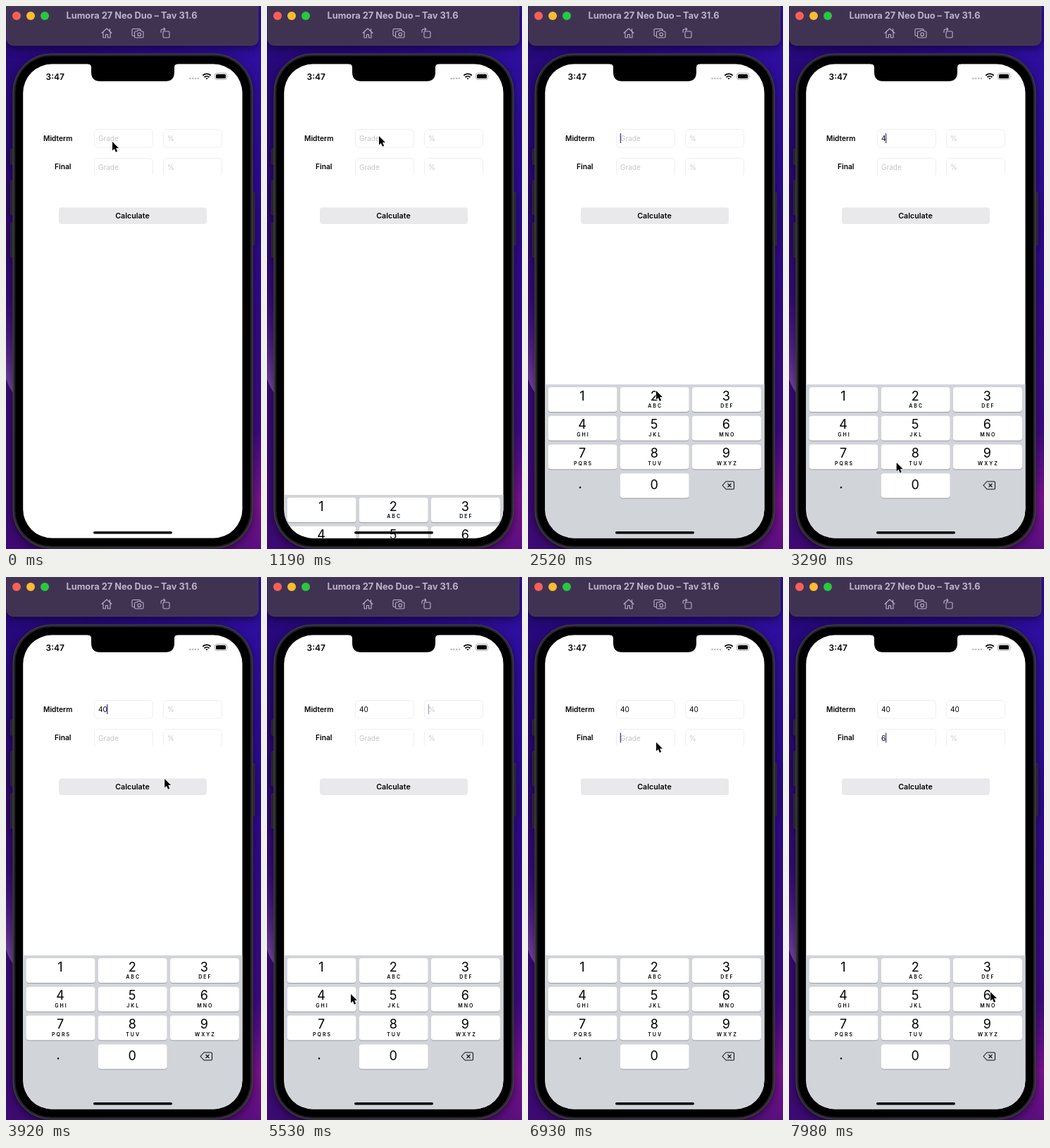
Write an HTML page that moves like this. It is 362 px wide and 772 px high and loops after 8 s.

```html
<!DOCTYPE html>
<html lang="en">
<head>
<meta charset="utf-8">
<title>Grade calculator</title>
<style>
html, body { margin: 0; width: 100%; height: 100%; overflow: hidden; background: #24086c; }
svg { display: block; width: 362px; height: 772px; font-family: Inter, Roboto, sans-serif; }
.label { font-weight: 600; font-size: 10.2px; }
.value { font-size: 10px; }
.digit { font-size: 18px; text-anchor: middle; }
.abc { font-size: 7px; font-weight: 600; letter-spacing: 2px; text-anchor: middle; }
.icon { fill: none; stroke: #bbb0cd; stroke-width: 1.1; stroke-linejoin: round; stroke-linecap: round; }
.field { fill: #fff; stroke: #eeeeef; }
.shadow { filter: drop-shadow(0 4px 6px rgba(0, 0, 0, .5)); }
</style>
</head>
<body>
<svg viewBox="0 0 362 772">
  <defs>
    <linearGradient id="wallL" x2="0" y2="1">
      <stop offset="0" stop-color="#270983"/><stop offset=".25" stop-color="#27086f"/>
      <stop offset=".5" stop-color="#320a70"/><stop offset="1" stop-color="#3c0a72"/>
    </linearGradient>
    <linearGradient id="wallR" x2="0" y2="1">
      <stop offset="0" stop-color="#2f10a4"/><stop offset=".4" stop-color="#2c0a8c"/>
      <stop offset=".78" stop-color="#3c0a82"/><stop offset=".91" stop-color="#78138c"/>
      <stop offset="1" stop-color="#5c0f80"/>
    </linearGradient>
    <linearGradient id="glow" x2="0" y2="1">
      <stop offset="0" stop-color="#4a1a86" stop-opacity="0"/><stop offset="1" stop-color="#7a4aa2"/>
    </linearGradient>
    <linearGradient id="across"><stop offset=".3" stop-color="#000"/><stop offset="1" stop-color="#fff"/></linearGradient>
    <mask id="blend"><rect width="362" height="772" fill="url(#across)"/></mask>
    <clipPath id="screen"><rect x="24.200" y="82.600" width="311.300" height="673.800" rx="41"/></clipPath>
    <clipPath id="cut"><rect x="120" y="210" width="200" height="30.500"/></clipPath>
  </defs>

  <rect width="362" height="772" fill="url(#wallL)"/>
  <rect width="362" height="772" fill="url(#wallR)" mask="url(#blend)"/>
  <path d="M0 400H12V552Q5 545 0 530z" fill="url(#glow)"/>

  <path class="shadow" d="M1 0H358V47a9 9 0 0 1-9 9H10a9 9 0 0 1-9-9z" fill="#403352" stroke="#584a6b" stroke-width=".6"/>
  <circle cx="15" cy="14" r="6" fill="#fe5f57"/>
  <circle cx="35" cy="14" r="6" fill="#febc2e"/>
  <circle cx="55" cy="14" r="6" fill="#28c840"/>
  <text x="178.500" y="18" text-anchor="middle" font-size="12.800" font-weight="700" fill="#bdb2d0">Lumora 27 Neo Duo – Tav 31.6</text>
  <g class="icon">
    <path d="M136 38.500L143 32l7 6.500M138 37.500v7.500h3.500v-4.500h3v4.500h3.500v-7.500M147.500 36v-3.500"/>
    <path d="M181.500 42.500h-1a1.500 1.500 0 0 1-1.500-1.500v-7a1.500 1.500 0 0 1 1.500-1.500h9a1.500 1.500 0 0 1 1.500 1.500"/>
    <path d="M184 36h2.200l1-1.500h4l1 1.500h1.300a1.500 1.500 0 0 1 1.500 1.500v6a1.500 1.500 0 0 1-1.500 1.500h-9.500a1.500 1.500 0 0 1-1.500-1.500v-6a1.500 1.500 0 0 1 1.500-1.500z"/>
    <circle cx="189.200" cy="40.300" r="2.300"/>
    <rect x="223" y="36" width="9" height="9" rx="1.500"/>
    <path d="M220 37.500v-2a2.500 2.500 0 0 1 2.500-2.500h3M224 31.200l1.800 1.800-1.800 1.800"/>
  </g>

  <g class="shadow">
    <g fill="#252429" stroke="#3a3740" stroke-width=".6">
      <rect x="6.500" y="203" width="5" height="22" rx="1"/>
      <rect x="6.500" y="248" width="5" height="49" rx="1"/>
      <rect x="6.500" y="308" width="5" height="49" rx="1"/>
      <rect x="348" y="265" width="5" height="75" rx="1"/>
    </g>
    <rect x="10" y="68" width="340" height="703" rx="54" fill="#29282b" stroke="#47464a"/>
    <rect x="13" y="71" width="334" height="697" rx="51" stroke="#161617"/>
  </g>

  <g clip-path="url(#screen)">
    <rect x="24" y="82" width="312" height="675" fill="#fff"/>
    <text x="56.500" y="104.500" font-size="12" font-weight="600">3:47</text>
    <g fill="#b9b9bb">
      <circle cx="261.500" cy="103" r="1.300"/><circle cx="265.300" cy="103" r="1.300"/>
      <circle cx="269.100" cy="103" r="1.300"/><circle cx="272.900" cy="103" r="1.300"/>
    </g>
    <g fill="none" stroke="#000" stroke-width="1.900">
      <path d="M279.300 98.700a8.200 8.200 0 0 1 11.400 0M281.500 101.300a5 5 0 0 1 7 0"/>
      <path d="M283.300 102.800L285 104.600l1.700-1.800q-1.700-1.300-3.400 0z" fill="#000" stroke="none"/>
    </g>
    <rect x="296.500" y="95.500" width="17" height="9" rx="2.700" fill="none" stroke="#a5a5a7"/>
    <rect x="298" y="97" width="14" height="6" rx="1.500"/>
    <path d="M315 98.500q1.300 1.500 0 3z" fill="#a5a5a7"/>
    <text class="label" x="53" y="192">Midterm</text>
    <text class="label" x="69" y="232">Final</text>
    <rect class="field" x="125.500" y="175.500" width="83" height="25.500" rx="5"/>
    <rect class="field" x="223.500" y="175.500" width="83" height="25.500" rx="5"/>
    <g clip-path="url(#cut)">
      <rect class="field" x="125.500" y="216.500" width="83" height="25.500" rx="5"/>
      <rect class="field" x="223.500" y="216.500" width="83" height="25.500" rx="5"/>
    </g>
    <g id="values"></g>
    <rect id="caret" width="1.400" height="14" fill="#4c48a0"/>
    <rect x="75" y="286.500" width="210" height="23.500" rx="4" fill="#e9e9eb"/>
    <text x="179.500" y="302" text-anchor="middle" font-size="10.700" font-weight="600">Calculate</text>
    <g id="pad">
      <rect x="24" y="538" width="312" height="236" fill="#d1d4d9"/>
      <g id="keys"></g>
      <circle cx="74" cy="684.500" r="1.200"/>
      <path d="M276 681.500l5-5.500h10a1.500 1.500 0 0 1 1.500 1.500v8a1.500 1.500 0 0 1-1.500 1.500h-10zM283.500 679l5 5M288.500 679l-5 5" fill="none" stroke="#111" stroke-width="1.100" stroke-linejoin="round"/>
    </g>
    <rect x="124" y="747" width="112" height="3.500" rx="1.750"/>
  </g>
  <path d="M116 81V82.500q5 0 5 5v6.500q0 13 13 13h92q13 0 13-13v-6.500q0-5 5-5v-1.500z"/>
  <path id="arrow" d="M0 0V12.500L2.900 9.900 4.900 14.700 7.100 13.700 5.100 9.100H9z" stroke="#fff" stroke-width="1.400" stroke-linejoin="round" paint-order="stroke"/>
</svg>
<script>
const $ = id => document.getElementById(id);
const FRAME = 70, LOOP = 8000, BLINK = 980, PRESS = 100;

const letters = ['', 'ABC', 'DEF', 'GHI', 'JKL', 'MNO', 'PQRS', 'TUV', 'WXYZ'];
const keyMarkup = (n, col, row) => {
  const x = 28.5 + col * 102.2, y = 542 + row * 40.8, mid = x + 49;
  const base = y + (n ? 18.5 : 23);
  return `<rect x="${x}" y="${y + 1}" width="98" height="35" rx="4" fill="#9a9ca1"/>
    <rect id="key${n}" x="${x}" y="${y}" width="98" height="35" rx="4"/>
    <text class="digit" x="${mid - 0.5}" y="${base}">${n}</text>
    <text class="abc" x="${mid + 1}" y="${y + 29.3}">${letters[n - 1] || ''}</text>`;
};
$('keys').innerHTML = letters.map((_, i) => keyMarkup(i + 1, i % 3, i / 3 | 0)).join('') + keyMarkup(0, 1, 3);

const fields = [[131, 192, 'Grade'], [229, 192, '%'], [131, 232.5, 'Grade'], [229, 232.5, '%']];
$('values').innerHTML = fields.map(([x, y]) => `<text class="value" x="${x}" y="${y}"/>`).join('');
const values = [...$('values').children];

// time, field, text, start of a caret blink
const edits = [
  [1120, 0, '', 980], [3010, 0, '4', 3570], [3460, 0, '40', 4060],
  [4340, 1, '', 4235], [5800, 1, '4', 6360], [6150, 1, '40', 6710],
  [6510, 2, '', 6300], [7840, 2, '6', 8400]
];
const presses = [[2920, 4], [3400, 0], [5740, 4], [6080, 0], [7770, 6]];
const path = [
  [0, 151, 193], [690, 151, 193], [780, 159, 185], [2200, 159, 185],
  [2520, 182, 547], [2800, 104, 598], [3150, 104, 598], [3390, 182, 680],
  [3500, 182, 680], [4090, 236, 188], [4880, 236, 188], [5530, 119, 593],
  [5670, 104, 598], [5830, 104, 598], [6060, 182, 680], [6160, 182, 680],
  [6490, 182, 235], [7100, 182, 235], [7740, 286, 590], [LOOP, 286, 590]
];

function pointer(t) {
  const i = path.findIndex(p => p[0] > t);
  const [t0, x0, y0] = path[i - 1], [t1, x1, y1] = path[i];
  const u = (t - t0) / (t1 - t0), e = u * u * (3 - 2 * u);
  return [x0 + (x1 - x0) * e, y0 + (y1 - y0) * e];
}

function caretAlpha(t, start) {
  const p = ((t - start) % BLINK + BLINK) % BLINK;
  if (p < 210) return Math.max(0, 1 - (p + 70) / 210);
  return Math.min(1, (p - 210) / 210);
}

function draw(t) {
  const texts = ['', '', '', ''];
  let active;
  for (const edit of edits) if (edit[0] <= t) {
    active = edit;
    texts[edit[1]] = edit[2];
  }
  values.forEach((el, i) => {
    el.textContent = texts[i] || fields[i][2];
    el.setAttribute('fill', texts[i] ? '#000' : '#c5c5c8');
  });

  const caret = $('caret');
  caret.setAttribute('opacity', active ? caretAlpha(t, active[3]) : 0);
  if (active) {
    const [x, y] = fields[active[1]];
    caret.setAttribute('x', x - 0.3 + active[2].length * 6.2);
    caret.setAttribute('y', y - 11);
  }

  const s = Math.max(0, (t - 1150) / 34);
  $('pad').setAttribute('transform', `translate(0 ${234 * (1 + s) * Math.exp(-s)})`);
  for (let n = 0; n < 10; n++) {
    const down = presses.some(([at, key]) => key === n && t >= at && t < at + PRESS);
    $('key' + n).setAttribute('fill', down ? '#b9bec7' : '#fff');
  }
  $('arrow').setAttribute('transform', `translate(${pointer(t)})`);
}

const began = performance.now();
function tick() {
  const t = (performance.now() - began) % LOOP;
  draw(Math.floor(t / FRAME) * FRAME);
  requestAnimationFrame(tick);
}
tick();
</script>
</body>
</html>
```
